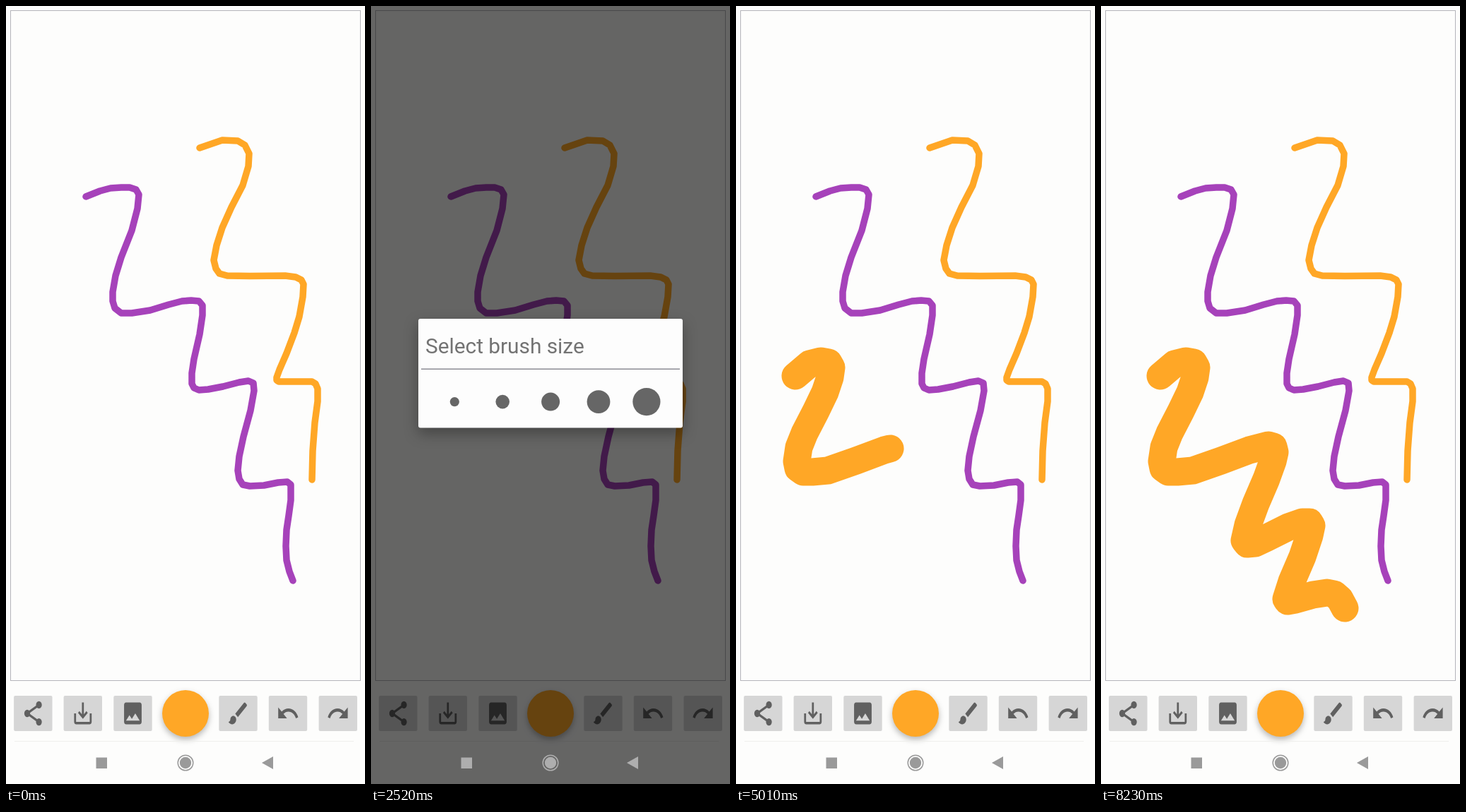
Animation, 508 px wide and 1102 px high, one loop 8270 ms. Source, as an HTML page:

```html
<!DOCTYPE html>
<html lang="en">
<head>
<meta charset="utf-8">
<title>Brush size</title>
<style>
  html, body { margin: 0; width: 100%; height: 100%; overflow: hidden; background: #fdfdfc; }
  svg { display: block; width: 100%; height: 100%; }
  .line { fill: none; stroke-width: 9.5; stroke-linecap: round; stroke-linejoin: round; }
  .purple { stroke: #a642ba; }
  .orange { stroke: #ffa726; }
  .btn { fill: #d6d6d6; }
  .icon { fill: #606060; }
  .fab { fill: #ffa726; filter: drop-shadow(0 4px 4px rgba(0, 0, 0, .28)); }
  .card { fill: #fdfdfd; filter: drop-shadow(0 8px 10px rgba(0, 0, 0, .32)); }
  .title { font: 29.8px Roboto, sans-serif; fill: #737373; }
  .press, .dim, .dialog, .thick, .nav { animation: 8270ms linear infinite; }
  .press { fill: #bebebe; animation-name: press; }
  .dim { animation-name: dim; }
  .dialog { animation-name: dialog; }
  .nav { animation-name: nav; }
  .thick { stroke-width: 39; stroke-dasharray: 1 2; animation-name: draw; }

  @keyframes press {
    0%, 24.3% { opacity: 0; }
    25.3%, 26.6% { opacity: 1; }
    29%, 100% { opacity: 0; }
  }
  @keyframes dim {
    0%, 25.51% { opacity: 0; }
    28.42%, 45.2% { opacity: .6; }
    47.6%, 100% { opacity: 0; }
  }
  @keyframes dialog {
    0%, 25.51% { opacity: 0; }
    26.48% { opacity: .74; }
    27.4%, 45.2% { opacity: 1; }
    47%, 100% { opacity: 0; }
  }
  @keyframes nav {
    0%, 25.51% { color: #9a9a9a; }
    26.48% { color: #c8c8c8; }
    28.42%, 45.2% { color: #aeaeae; }
    46.6% { color: #b8b8b8; }
    47.6%, 100% { color: #9a9a9a; }
  }
  @keyframes draw {
    0%, 53.9% { stroke-dashoffset: 1; opacity: 0; }
    54% { stroke-dashoffset: 1; opacity: 1; }
    69.6%, 100% { stroke-dashoffset: 0; opacity: 1; }
  }
</style>
</head>
<body>
<svg viewBox="0 0 508 1102" preserveAspectRatio="none">
  <rect width="508" height="1102" fill="#fdfdfc"/>
  <rect x="6.5" y="6.5" width="495" height="949" fill="none" stroke="#b4b4ba"/>

  <path class="line purple" d="M113 270 133 262 148 258 163 257 175 257 184 260 188 267 186 287 178 318 163 356 155 382 151 405 151 418 154 428 163 435 178 435 204 431 230 423 249 418 262 417 273 418 278 424 278 438 274 465 266 500 263 520 263 535 266 541 273 544 286 543 307 539 330 533 343 531 350 534 351 545 346 573 336 610 330 638 328 658 330 670 335 678 345 680 365 679 385 675 398 674 403 678 403 700 400 722 397 742 396 765 397 785 401 801 406 814"/>
  <path class="line orange" d="M274 201 306 190 328 191 338 197 344 209 343 227 335 254 319 285 306 314 298 339 294 360 297 372 302 379 313 382 345 382.5 395 382 410 384 418 388 421 394 420 412 415 440 408 463 397 492 387 515 383 526 383 530 386 532 410 532 433 532 438 535 441 542 441 560 437 590 434 630 433 671"/>
  <path class="line orange thick" pathLength="1" d="M84 524 104 507 120 503 131 505 135 512 133 526 126 547 113 574 97 605 89 625 86 645 88 655 95 660 108 660 130 658 170 644 210 629 237 622 244 624 246 632 243 645 234 670 219 705 208 735 203 757 207 762 218 761 235 753 265 738 285 731 295 731 298 736 295 750 285 780 270 815 262 840 264 843 275 841 300 834 320 831 330 833 338 840 345 853"/>

  <g id="bar"></g>
  <circle class="fab" cx="254" cy="1002" r="33"/>
  <path d="M12 1041.5H492" stroke="#efefec"/>

  <rect class="dim" width="508" height="1102"/>

  <g class="nav" fill="currentColor">
    <rect x="127.5" y="1064.5" width="15.5" height="15.5"/>
    <circle cx="254" cy="1072" r="8.2"/>
    <circle cx="254" cy="1072" r="10.8" fill="none" stroke="currentColor" stroke-width="1.5"/>
    <path d="M362 1072 378 1063V1081Z"/>
  </g>

  <g class="dialog">
    <rect class="card" x="67" y="443" width="374" height="154.5" rx="3"/>
    <text class="title" x="77" y="492">Select brush size</text>
    <path d="M71 514.2H437" stroke="#8c8c94" stroke-width="1.4"/>
    <g id="sizes" fill="#666"></g>
  </g>
</svg>
<script>
  const NS = 'http://www.w3.org/2000/svg';
  const add = (parent, tag, attrs) => {
    const el = document.createElementNS(NS, tag);
    for (const key in attrs) el.setAttribute(key, attrs[key]);
    return parent.appendChild(el);
  };

  const dot = (x, y) => `M${x - 3} ${y}a3 3 0 1 0 6 0a3 3 0 1 0-6 0z`;
  const icons = {
    share: dot(18, 5) + dot(6, 12) + dot(18, 19) +
      'M17.5 4.1 5 11.4v1.2L17.5 19.9l1-1.8L8 12 18.5 5.9z',
    save: 'M19 12v7H5v-7H3v7c0 1.1.9 2 2 2h14c1.1 0 2-.9 2-2v-7zM13 12.67l2.59-2.58L17 11.5l-5 5-5-5 1.41-1.41L11 12.67V3h2z',
    image: 'M21 19V5c0-1.1-.9-2-2-2H5c-1.1 0-2 .9-2 2v14c0 1.1.9 2 2 2h14c1.1 0 2-.9 2-2zM8.5 13.5l2.5 3L14.5 12l4.5 6H5z',
    brush: 'M7 14c-1.66 0-3 1.34-3 3 0 1.31-1.16 2-2 2 .92 1.22 2.49 2 4 2 2.21 0 4-1.79 4-4 0-1.66-1.34-3-3-3zM20.71 4.63l-1.34-1.34a1 1 0 0 0-1.41 0L9 12.25 11.75 15l8.96-8.96c.39-.39.39-1.02 0-1.41z',
    undo: 'M12.5 8c-2.65 0-5.05 1-6.9 2.6L2 7v9h9l-3.62-3.62c1.39-1.16 3.16-1.88 5.12-1.88 3.54 0 6.55 2.31 7.6 5.5l2.37-.78C21.08 11.03 17.15 8 12.5 8z',
    redo: 'M18.4 10.6C16.55 9 14.15 8 11.5 8c-4.65 0-8.58 3.03-9.96 7.22L3.9 16c1.05-3.19 4.05-5.5 7.6-5.5 1.95 0 3.73.72 5.12 1.88L13 16h9V7z'
  };
  const centers = { share: 38.3, save: 108.8, image: 179.5, brush: 328.5, undo: 399, redo: 469.8 };

  const bar = document.getElementById('bar');
  for (const name in icons) {
    const x = centers[name];
    const box = { x: x - 27.2, y: 977, width: 54.4, height: 50, rx: 2 };
    add(bar, 'rect', { class: 'btn', ...box });
    if (name === 'brush') add(bar, 'rect', { class: 'press', ...box });
    add(bar, 'path', {
      class: 'icon', d: icons[name],
      transform: `translate(${x} 1002) scale(1.38 1.72) translate(-12 -12)`
    });
  }

  const sizes = document.getElementById('sizes');
  [6.6, 9.8, 13, 16.4, 19.6].forEach((r, i) =>
    add(sizes, 'circle', { cx: 118.3 + 67.9 * i, cy: 560.6, r }));
</script>
</body>
</html>
```
